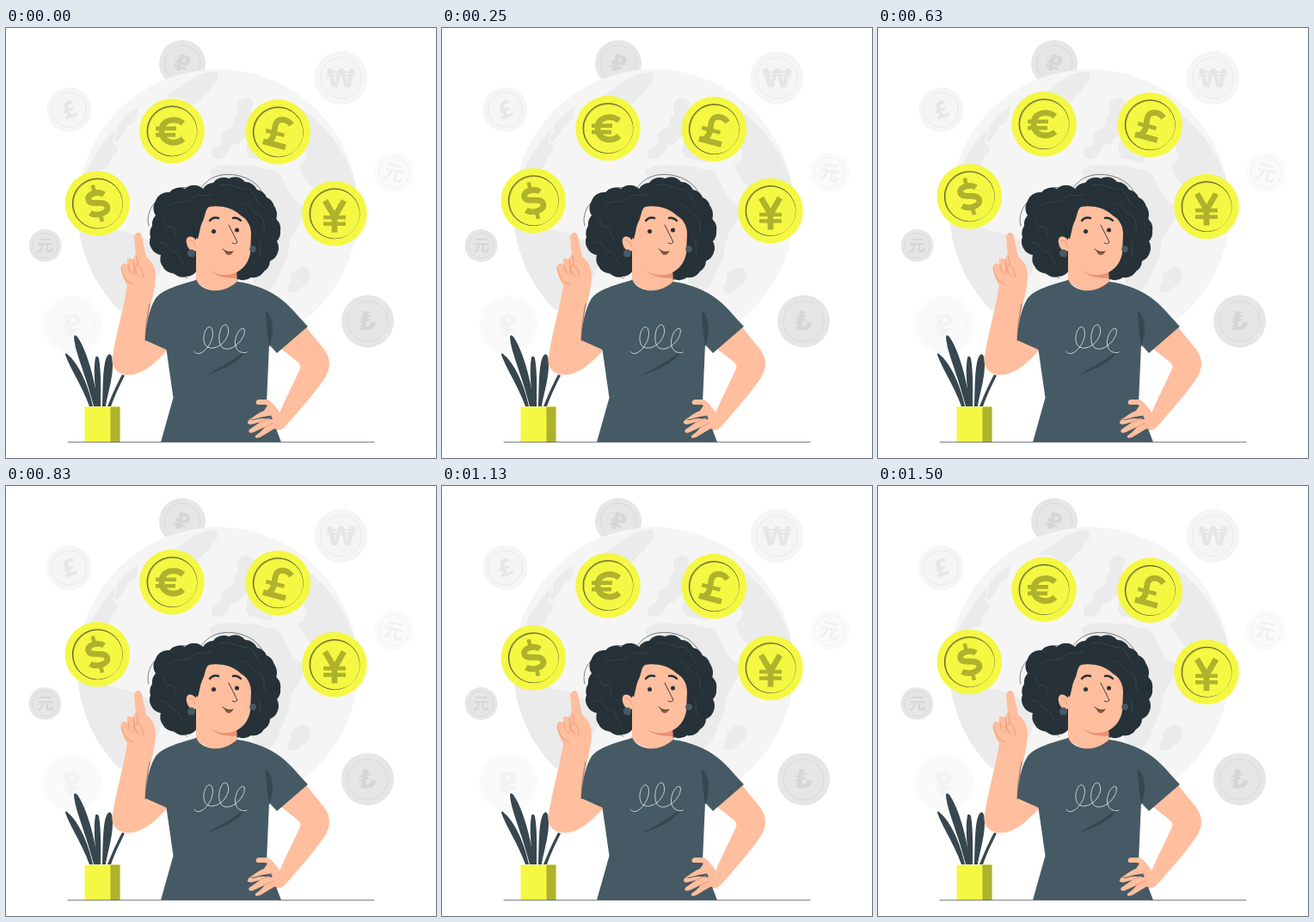
Write an HTML page that moves like this. It is 500x500 px and loops after 1.54 s.

```html
<!DOCTYPE html>
<html lang="en">
<head>
<meta charset="utf-8">
<title>Currency coins</title>
<style>
  html, body { margin: 0; height: 100%; overflow: hidden; background: #fff; }
  svg { display: block; width: 100%; height: 100%; }
  text { font-family: "DejaVu Sans", "Noto Sans CJK SC", sans-serif; font-weight: bold; text-anchor: middle; }
  .line { fill: none; stroke: #263238; stroke-linecap: round; stroke-linejoin: round; }
  .skin { fill: #ffbe9d; }
  .crease { fill: none; stroke: #eb9073; stroke-width: .8; stroke-linecap: round; }
  .dark { fill: #263238; }
  .shirt { fill: #455a64; }
  .fold { fill: #37474f; }
  .strand { fill: none; stroke: #455a64; stroke-width: .5; }
  .glyph { fill: none; stroke: #afb22d; stroke-width: 6.8; }
  .bars { fill: none; stroke: #afb22d; stroke-width: 4.6; }
</style>
</head>
<body>
<svg viewBox="0 0 500 500">
  <g id="backCoins"></g>

  <circle cx="246.300" cy="211" r="163.200" fill="#f5f5f5"/>
  <g fill="#ebebeb">
    <path d="M187 79C192 76 196 72 202 70C211 62 222 55 233 52L244 51C249 55 246 61 242 65C238 68 237 75 231 78C226 82 224 89 217 90C211 90 209 83 203 82C197 80 191 82 187 79Z"/>
    <path d="M155 92C151 97 154 101 151 106C148 112 141 111 139 118C138 124 131 128 129 133C123 132 126 125 130 121C127 116 131 111 136 106C141 101 148 95 155 92Z"/>
    <path d="M127 118C119 126 109 139 101 153C95 164 90 174 89 180C98 171 104 166 115 164C123 160 119 151 126 147C132 143 129 137 124 133Z"/>
    <path d="M84 228C100 226 118 232 132 236C150 238 168 246 182 262C186 280 170 300 155 318L132 328C109 306 88 270 84 228Z"/>
    <path d="M270 86C276 79 285 80 288 87L284 97L289 110L281 116L280 126C272 129 272 136 264 136C259 140 259 147 251 151C243 155 236 149 240 142C244 136 250 137 252 131C247 126 251 120 259 118C267 114 262 107 268 102C274 96 266 92 270 86Z"/>
    <path d="M282 125L289 139L298 147L310 150L308 157L294 153L283 151L279 143Z"/>
    <path d="M236 166C250 156 267 160 278 160C292 158 300 166 313 165C323 172 325 186 333 197C340 207 352 205 347 216C341 230 330 240 329 254C328 270 320 278 317 290C311 304 301 310 291 302L260 240Z"/>
    <path d="M343 94C371 111 393 142 404 173C409 190 411 214 407 239C398 238 392 226 385 217C376 209 370 198 361 190C352 182 344 172 340 159C348 157 352 149 347 141C342 132 350 125 348 115C346 107 338 101 343 94Z"/>
    <path d="M338 281C345 275 354 278 354 287C354 295 348 299 343 302C338 309 329 309 327 304C327 298 332 296 331 290C331 285 334 283 338 281Z"/>
  </g>

  <g id="coins"></g>

  <g class="fold">
    <path d="M79 360C81 380 92 400 102 440H107C104 410 94 375 83 359Q79 355 79 360Z"/>
    <path d="M69 380C74 395 88 415 97 440H101C96 415 84 390 73 381Q69 376 69 380Z"/>
    <path d="M104 383C101 400 104 420 106 440H110C110 425 111 400 108 384Q106 380 104 383Z"/>
    <path d="M118 381C112 390 113 420 112 440H116C118 425 127 400 123 382Q121 377 118 381Z"/>
    <path d="M135 403C130 412 124 425 118 440H122C126 428 132 416 138 404Z"/>
  </g>
  <path fill="#f4f843" d="M91.500 440.500H132.500V481.500H91.500Z"/>
  <path fill="#afb22d" d="M121.500 440.500H132.500V481.500H121.500Z"/>
  <path class="line" stroke-width=".6" d="M72 481.500H428"/>

  <path id="hair" class="dark"/>
  <path class="line" stroke-width=".6" d="M227 186C237 171 253 169 267 171C284 174 293 182 298 191M176 201C167 207 163 221 166 230M193 189Q204 183 218 187M312 207C318 219 310 229 316 239M184 280C194 288 204 286 211 291"/>
  <path class="strand" d="M190 207C198 198 208 206 217 198C225 190 232 199 240 192M180 222C186 216 182 234 190 231C199 231 193 244 201 245M249 183C263 179 272 190 281 187C291 191 290 202 297 207M274 203C286 206 288 216 296 219C304 225 296 235 304 240M177 250C188 246 187 259 197 261C204 264 201 273 209 276M291 244C300 251 291 261 299 267"/>

  <path class="skin" d="M345 342C355 356 364 366 371 375C379 387 377 399 368 411C355 429 339 447 325 463C318 471 309 467 306 464L297 444L318 448C325 431 335 412 342 396C344 391 339 388 334 384L316 370Z"/>
  <path class="skin" d="M153 238C157 237 158 241 159 247L163 266C170 271 174 278 174 288C174 301 169 318 166 333L170 360L188 374C175 388 163 400 147 403C132 405 121 396 124 382C128 354 137 327 141 299C136 292 134 284 134 277C135 272 140 274 142 276C139 268 142 266 147 269L151 264L149 243Q150 239 153 238Z"/>
  <path class="crease" d="M134 279C136 290 141 296 148 298M142 275Q143 287 148 286M148 270Q149 284 155 289M151 264Q154 270 153 276C157 278 160 283 159 290M153 276C148 276 147 282 151 286"/>

  <path class="skin" d="M221 244L221 294Q240 314 269 299L268 280Z"/>
  <path class="shirt" d="M221 293C227 307 251 312 269 295C286 297 308 305 322 317C333 326 342 338 351 347L315 378L306 368L303 437L320 481.500H180L194.500 430L186.500 374L162 363C163 345 166 328 173 316C180 304 204 298 221 293Z"/>
  <path class="fold" d="M302 329C313 337 311 359 306 371C304 355 302 343 302 329ZM231 405C248 394 262 389 279 374C271 390 251 397 231 405Z"/>
  <path class="line" stroke-width=".5" d="M167 321C164 336 162 350 162 364M221 293C227 307 251 312 269 295"/>
  <path fill="none" stroke="#fff" stroke-width=".7" stroke-linecap="round" d="M219 376C226 387 246 362 239 349C233 342 225 364 234 371C247 377 264 358 257 346C250 340 243 365 252 372C263 378 280 360 277 350C271 346 262 366 269 374Q273 379 280 377"/>

  <path class="skin" d="M326 447L306 451C297 452 289 455 283 456C279 458 281 461 285 461L296 458C290 462 286 465 283 467C281 470 284 472 288 470L301 464C297 469 293 472 290 474C289 478 293 477 297 475L312 466Q322 468 327 459ZM300 445L304 439L302 438L293 438C289 437 290 432 295 432L304 432C309 434 313 440 317 445L322 456L299 454Q293 454 288 456L282 456C288 452 294 447 300 445Z"/>
  <path class="crease" d="M296 458L307 453M301 464L311 459"/>

  <path fill="#eb9073" d="M235 280C246 289 259 287 268 284L268 291C254 291 242 288 235 280Z"/>
  <path class="skin" d="M222 248C216 239 208 242 210 250C211 258 218 262 223 258C224 273 235 284 250 287C268 289 281 278 284 262L285 240C285 229 280 222 273 218C262 207 245 206 236 208C231 211 232 220 228 226C225 233 225 241 222 248Z"/>
  <path class="crease" d="M213 247Q219 246 220 254"/>
  <circle cx="215.500" cy="262" r="4.600" fill="#455a64"/>
  <circle cx="287" cy="257" r="3.800" fill="#455a64"/>
  <circle class="dark" cx="241.500" cy="236.500" r="2.500"/>
  <circle class="dark" cx="268.500" cy="235" r="2.500"/>
  <path class="line" stroke-width="2.400" d="M237 224Q241 219 247 221M264 221Q269 220 273 224"/>
  <path class="line" stroke-width=".9" d="M259 229L269 249Q267 252 263 250"/>
  <path fill="#8a5a3c" d="M253 258Q258 262 264 260Q261 266 256 263Z"/>
  <path class="line" stroke-width=".9" d="M252 257Q257 262 264 260"/>
</svg>
<script>
const LOOP = 1540, LIFT = 10, LEAD = 40;
const $ = id => document.getElementById(id);

// x, y, radius, body, glyph colour, glyph, tilt
const backCoins = [
  [205, 41, 27, '#e6e6e6', '#d6d6d6', '₽', 15],
  [73.5, 95, 26, '#f5f5f5', '#e6e6e6', '£', -20],
  [389.5, 58, 31, '#f5f5f5', '#e6e6e6', '₩', 0],
  [451, 168, 23, '#fafafa', '#f0f0f0', '元', 12],
  [45.5, 253, 19, '#e6e6e6', '#d6d6d6', '元', 0],
  [77, 345, 34, '#fafafa', '#f3f3f3', '₽', -15],
  [420.5, 341, 30.5, '#e6e6e6', '#d6d6d6', '₺', 10]
];
$('backCoins').innerHTML = backCoins.map(([x, y, r, body, ink, glyph, tilt]) => `
  <g transform="translate(${x} ${y}) rotate(${tilt})">
    <circle r="${r}" fill="${body}"/>
    <circle r="${r * .77}" fill="none" stroke="${ink}" stroke-width=".8"/>
    <text y="${r * .36}" font-size="${r}" fill="${ink}">${glyph}</text>
  </g>`).join('');

// x, resting y, glyph strokes, thin bars, tilt
const coins = [
  [106.3, 204.5, 'M10 -8C5 -14 -9 -14 -9 -7C-9 2 10 -3 10 7C10 14 -5 15 -11 8.500', 'M0 -22V-11M0 11V22', -15],
  [193, 120.4, 'M13 -9C4 -16 -12 -14 -12 0C-12 15 5 16 13 9', 'M-19 -3H5M-19 4.500H4', 0],
  [316.3, 121.4, 'M13 -12C6 -18 -5 -16 -5 -7C-5 2 -1 8 -9 15M-14 15H13', 'M-14 2H8', 15],
  [382, 216.3, 'M-11 -15L0 4L11 -15M0 2V22', 'M-13 4.500H13M-13 12H13', 0]
];
$('coins').innerHTML = coins.map(([x, y, glyph, bars, tilt]) => `
  <g transform="translate(${x} ${y})">
    <circle r="37.800" fill="#f4f843"/>
    <circle r="29" fill="#afb22d" stroke="#263238" stroke-width=".7"/>
    <circle cx=".8" cy=".6" r="28.300" fill="#f4f843"/>
    <g transform="rotate(${tilt})">
      <path class="glyph" d="${glyph}"/>
      <path class="bars" d="${bars}"/>
    </g>
  </g>`).join('');

// Curls: outward arcs running clockwise through the points
const curls = [[174, 218], [174, 201], [190, 191], [208, 187], [229, 187], [241, 180], [259, 175],
  [278, 179], [292, 188], [303, 197], [312, 208], [314, 222], [319, 236], [315, 248], [316, 261],
  [307, 271], [300, 283], [285, 290], [270, 292], [240, 270], [222, 282], [210, 289], [195, 285],
  [182, 277], [180, 264], [169, 256], [168, 243], [170, 230], [174, 218]];
$('hair').setAttribute('d', 'M' + curls[0] + curls.slice(1).map(p => 'A15 15 0 0 1 ' + p).join(''));

function draw(now) {
  const phase = (now + LEAD) % LOOP / LOOP;
  const rise = LIFT * (1 - Math.abs(1 - 2 * phase));
  $('coins').setAttribute('transform', `translate(0 ${-rise})`);
  requestAnimationFrame(draw);
}
draw(0);
</script>
</body>
</html>
```
